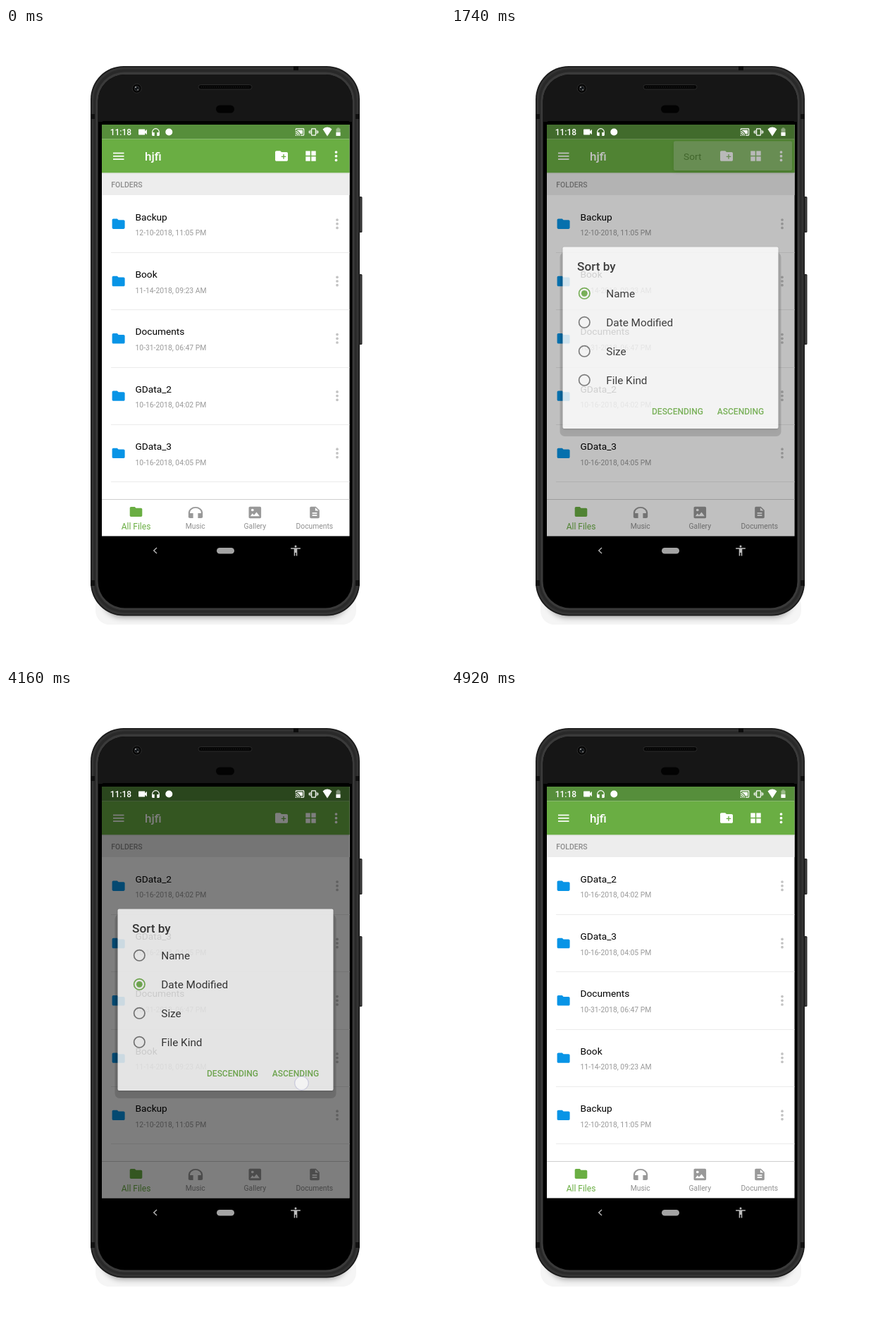
Write an HTML page with a canvas that moves like this. It is 623 px wide and 899 px high and loops after 5360 ms.

```html
<!DOCTYPE html>
<html lang="en">
<head>
<meta charset="utf-8">
<title>File list sorting</title>
<style>
html, body { margin: 0; width: 100%; height: 100%; overflow: hidden; background: #fff; }
canvas { display: block; width: 623px; height: 899px; }
</style>
</head>
<body>
<canvas id="stage" width="623" height="899"></canvas>
<script>
const W = 623, H = 899, LOOP = 5360;
const stage = document.getElementById('stage').getContext('2d');
const sheet = document.createElement('canvas');
sheet.width = W;
sheet.height = H;
const sheetCtx = sheet.getContext('2d');
let c = stage;

const GREEN = '#6aae43', GREY = '#999';
const ROW = 81.3;
const files = [
  ['Backup', '12-10-2018, 11:05 PM'],
  ['Book', '11-14-2018, 09:23 AM'],
  ['Documents', '10-31-2018, 06:47 PM'],
  ['GData_2', '10-16-2018, 04:02 PM'],
  ['GData_3', '10-16-2018, 04:05 PM']
];
const byDate = [3, 4, 2, 1, 0].map(i => files[i]);
const options = ['Name', 'Date Modified', 'Size', 'File Kind'];

// Icons on a 24 unit grid
const paths = {
  folder: 'M10 4H4c-1.1 0-2 .9-2 2v12c0 1.1.9 2 2 2h16c1.1 0 2-.9 2-2V8c0-1.1-.9-2-2-2h-8z',
  newFolder: 'M20 6h-8l-2-2H4c-1.1 0-2 .9-2 2v12c0 1.1.9 2 2 2h16c1.1 0 2-.9 2-2V8c0-1.1-.9-2-2-2zm-1 7.7h-2.9v2.9h-1.5v-2.9h-2.9v-1.5h2.9V9.300h1.5v2.9H19z',
  headset: 'M12 3a9 9 0 0 0-9 9v7c0 1.1.9 2 2 2h4v-8H5v-1a7 7 0 0 1 14 0v1h-4v8h4c1.1 0 2-.9 2-2v-7a9 9 0 0 0-9-9z',
  page: 'M14 2H6c-1.1 0-2 .9-2 2v16c0 1.1.9 2 2 2h12c1.1 0 2-.9 2-2V8zm2 16H8v-2h8zm0-4H8v-2h8zm-3-5V3.500L18.500 9z',
  image: 'M4 2h16c1.1 0 2 .9 2 2v16c0 1.1-.9 2-2 2H4c-1.1 0-2-.9-2-2V4c0-1.1.9-2 2-2zM4.500 18.500h15l-5-7-4 5-2.500-3zM8 5.500a2.200 2.200 0 1 0 0 4.400 2.200 2.200 0 1 0 0-4.400z',
  video: 'M17 10.500V7c0-.5-.5-1-1-1H4c-.5 0-1 .5-1 1v10c0 .5.5 1 1 1h12c.5 0 1-.5 1-1v-3.500l4 4v-11z',
  cast: 'M1 18v3h3a3 3 0 0 0-3-3zm0-4v2a5 5 0 0 1 5 5h2a7 7 0 0 0-7-7zM19 7H5v1.600A13 13 0 0 1 13.400 17H19zM1 10v2a9 9 0 0 1 9 9h2A11 11 0 0 0 1 10zM21 3H3a2 2 0 0 0-2 2v3h2V5h18v14h-7v2h7a2 2 0 0 0 2-2V5a2 2 0 0 0-2-2z',
  vibrate: 'M0 15h2V9H0zm3 2h2V7H3zM22 9v6h2V9zm-3 8h2V7h-2zM16.500 3h-9A1.500 1.500 0 0 0 6 4.500v15A1.500 1.500 0 0 0 7.500 21h9a1.500 1.500 0 0 0 1.500-1.500v-15A1.500 1.500 0 0 0 16.500 3zM16 19H8V5h8z',
  wifi: 'M0 7A18 18 0 0 1 24 7L12 22z',
  person: 'M12 2a2 2 0 1 1 0 4 2 2 0 1 1 0-4zM21 9h-6v13h-2v-6h-2v6H9V9H3V7h18z'
};
const icons = {};
for (const name in paths) icons[name] = new Path2D(paths[name]);

const clamp = v => Math.min(1, Math.max(0, v));
const ramp = (t, a, b) => clamp((t - a) / (b - a));
const easeOut = v => 1 - (1 - v) * (1 - v);

function rect(x, y, w, h, fill) {
  c.fillStyle = fill;
  c.fillRect(x, y, w, h);
}

function round(x, y, w, h, r, fill, stroke, line = 1) {
  c.beginPath();
  c.roundRect(x, y, w, h, r);
  if (fill) { c.fillStyle = fill; c.fill(); }
  if (stroke) { c.strokeStyle = stroke; c.lineWidth = line; c.stroke(); }
}

function disc(x, y, r, fill, stroke, line = 1) {
  c.beginPath();
  c.arc(x, y, r, 0, Math.PI * 2);
  if (fill) { c.fillStyle = fill; c.fill(); }
  if (stroke) { c.strokeStyle = stroke; c.lineWidth = line; c.stroke(); }
}

function text(str, x, y, size, fill, weight = 400, align = 'left') {
  c.font = `${weight} ${size}px Roboto, sans-serif`;
  c.textAlign = align;
  c.fillStyle = fill;
  c.fillText(str, x, y);
}

function icon(name, x, y, sx, fill, sy = sx) {
  c.save();
  c.translate(x, y);
  c.scale(sx, sy);
  c.translate(-12, -12);
  c.fillStyle = fill;
  c.fill(icons[name], 'evenodd');
  c.restore();
}

function dots(x, y, fill) {
  for (let i = -1; i < 2; i++) disc(x, y + i * 5.7, 1.85, fill);
}

// Draws a window as one flat group with a single opacity
function layer(alpha, draw) {
  if (alpha <= 0) return;
  sheetCtx.clearRect(0, 0, W, H);
  c = sheetCtx;
  draw();
  c = stage;
  c.globalAlpha = alpha;
  c.drawImage(sheet, 0, 0);
  c.globalAlpha = 1;
}

function clipped(x, y, w, h, draw) {
  c.save();
  c.beginPath();
  c.rect(x, y, w, h);
  c.clip();
  draw();
  c.restore();
}

function withShadow(color, blur, dy, draw) {
  c.save();
  c.shadowColor = color;
  c.shadowBlur = blur;
  c.shadowOffsetY = dy;
  draw();
  c.restore();
}

function phone() {
  rect(0, 0, W, H, '#fff');
  round(127, 800, 370, 46, 20, '#f5f5f5');
  withShadow('rgba(0,0,0,.4)', 10, 3, () => round(138, 780, 346, 52, 42, '#333'));

  for (const [y, h] of [[239, 51], [349, 100]]) {
    round(499, y, 6.5, h, 1.5, '#2b2b2b');
    rect(503, y + 2, 1, h - 4, '#4a4a4a');
  }
  round(120, 54, 382, 779.5, 47, '#191919');
  round(121.5, 55.5, 379, 776.5, 46, '#333');
  round(124.5, 58.5, 373, 770.5, 43, '#292929');
  round(127.5, 62.5, 367, 763, 41, '#3a3a3a');
  for (const x of [120, 496]) {
    rect(x, 122, 6, 7, '#111');
    rect(x, 783, 6, 8, '#111');
  }
  rect(408, 54, 7, 6, '#0c0c0c');
  round(130.5, 66, 361, 756.5, 38, '#000');
  clipped(130, 60, 362, 73, () => round(130.5, 66, 361, 756.5, 38, '#161616'));
  rect(137, 132, 350, 5, '#000');

  disc(185.7, 85.7, 6.5, '#050505', '#2b2b2b');
  disc(185.7, 85.7, 3.4, '#101418', '#333');
  disc(184, 84, 1, '#aaa');
  disc(187, 87.5, .9, '#888');
  round(273, 80.5, 76, 6.5, 3.2, '#060606', '#2a2a2a');
  c.setLineDash([1, 2]);
  c.strokeStyle = '#222';
  c.beginPath();
  c.moveTo(277, 83.7);
  c.lineTo(346, 83.7);
  c.stroke();
  c.setLineDash([]);
  round(298, 109.5, 26, 11, 5.5, '#030303');

  c.strokeStyle = '#bbb';
  c.lineWidth = 1.3;
  c.beginPath();
  c.moveTo(214, 737);
  c.lineTo(209.7, 741);
  c.lineTo(214, 745);
  c.stroke();
  round(299, 737, 25, 8.5, 4.25, '#a4a4a4');
  icon('person', 411, 741, .76, '#bdbdbd');
}

function app(list) {
  rect(136, 137, 351.5, 583.5, '#fff');
  rect(136, 205, 351.5, 32, '#ededed');
  rect(136, 137, 351.5, 20.5, '#568e3b');
  rect(136, 157.5, 351.5, 48, GREEN);
  rect(136, 205.5, 351.5, 1, '#dcdfda');

  for (let i = -1; i < 2; i++) rect(152, 180.9 + i * 4.3, 15.5, 1.7, '#fff');
  text('hjfi', 197, 188, 17.1, '#fff', 500);
  icon('newFolder', 391, 181.5, .9, '#fff');
  for (const x of [425.3, 433.3])
    for (const y of [174.4, 182.3]) rect(x, y, 6.4, 6.4, '#fff');
  dots(468.5, 181.7, '#fff');
  text('FOLDERS', 149.2, 226, 10.5, '#8c8c8c', 500);

  list.forEach(([name, date], i) => {
    const y = 277.7 + i * ROW;
    icon('folder', 159.6, y, .9, '#0894e6');
    text(name, 183.5, y - 5, 13.7, '#000');
    text(date, 183.5, y + 16.6, 10.35, GREY);
    dots(470, y, '#c3c3c3');
    rect(149, Math.round(y + 40.3), 338.5, 1, '#ebebeb');
  });

  rect(136, 668, 351.5, 1, '#cfcfcf');
  icon('folder', 184.5, 686, .88, GREEN);
  text('All Files', 184.5, 710.5, 12, GREEN, 400, 'center');
  icon('headset', 269, 687, 1.13, GREY, .88);
  icon('image', 353.3, 687, .88, GREY, .82);
  icon('page', 438, 687, .85, GREY, .82);
  ['Music', 'Gallery', 'Documents'].forEach((s, i) =>
    text(s, 268.8 + i * 84.5, 709.8, 10.3, '#8f8f8f', 400, 'center'));
}

function statusIcons() {
  text('11:18', 147.7, 152.3, 12, '#fff', 500);
  icon('video', 194, 147.5, .66, '#fff');
  icon('headset', 212.5, 147.5, .6, '#fff');
  disc(231.3, 147.5, 5, '#fff');
  icon('cast', 417, 147.5, .57, '#fff');
  icon('vibrate', 436.5, 147.5, .57, '#fff');
  icon('wifi', 456, 146.8, .54, '#fff', .66);
  round(468.5, 142.5, 6, 10.5, 1, 'rgba(255,255,255,.4)');
  rect(470, 141.5, 3, 1, 'rgba(255,255,255,.4)');
  rect(468.5, 148, 6, 5, '#fff');
}

function popup(open, press) {
  const w = 168 * (.4 + .6 * open), h = 41.5 * (.4 + .6 * open);
  const x = 484 - w;
  withShadow('rgba(0,0,0,.35)', 6, 2, () => round(x, 160.5, w, h, 2, '#fff'));
  clipped(x, 160.5, w, h, () => {
    if (press > 0) disc(403, 175, 95 * press, 'rgba(0,0,0,.12)');
    text('Sort', 330, 186.7, 13.7, '#212121');
  });
}

function radio(x, y, on) {
  disc(x, y, 7.7, null, on > .4 ? GREEN : '#6e6e6e', 1.7);
  if (on > 0) disc(x, y, 4.4 * on, GREEN);
}

function dialog(t) {
  const swap = ramp(t, 3360, 3520);
  withShadow('rgba(0,0,0,.12)', 4, 0, () =>
    round(154.5, 318, 314, 261, 7, 'rgba(0,0,0,.17)'));
  withShadow('rgba(0,0,0,.2)', 3, 1, () =>
    round(158.5, 310.5, 306, 257.5, 2, '#fff'));

  const grow = easeOut(ramp(t, 3270, 3500));
  const fade = 1 - ramp(t, 3460, 3670);
  if (grow > 0 && fade > 0)
    clipped(158.5, 397, 306, 41, () =>
      disc(265, 424.5, 10 + 195 * grow, `rgba(0,0,0,${.12 * fade})`));

  text('Sort by', 179, 344, 17.2, '#212121', 500);
  options.forEach((s, i) => {
    const y = 376.3 + i * 41;
    radio(189.3, y, i === 0 ? 1 - swap : i === 1 ? swap : 0);
    text(s, 220.3, y + 5.8, 15.3, '#212121');
  });
  text('DESCENDING', 285, 548.3, 12, GREEN, 500);
  text('ASCENDING', 377.8, 548.3, 12, GREEN, 500);
}

function touch(t, x, y, from, to) {
  if (t < from || t >= to) return;
  c.globalAlpha = 1 - .6 * ramp(t, to - 90, to);
  disc(x, y, 9.8, 'rgba(255,255,255,.55)', 'rgba(150,150,195,.4)', 1.2);
  c.globalAlpha = 1;
}

function draw(t) {
  phone();
  app(t < 4140 ? files : byDate);

  const ring = ramp(t, 450, 540), ringFade = 1 - ramp(t, 560, 700);
  if (ring > 0 && ringFade > 0)
    clipped(136, 157.5, 351.5, 48, () =>
      disc(468.5, 181.5, 8 + 12 * ring, `rgba(255,255,255,${.25 * ringFade})`));

  const popupAlpha = t < 1300 ? ramp(t, 500, 600) : 1 - ramp(t, 1664, 1770);
  layer(popupAlpha, () =>
    popup(easeOut(ramp(t, 500, 720)), easeOut(ramp(t, 1400, 1600))));

  const dim = t < 3000
    ? .6 * ramp(t, 1682, 1825)
    : .6 * (1 - ramp(t, 4138, 4284)) + .012 * ramp(t, 4240, 4284) * (1 - ramp(t, 4284, 4320));
  if (dim > 0) rect(136, 137, 351.5, 583.5, `rgba(0,0,0,${dim})`);
  statusIcons();

  const shown = t < 3000 ? ramp(t, 1660, 1760) : 1 - ramp(t, 4138, 4248);
  layer(shown, () => dialog(t));

  touch(t, 468, 182, 340, 600);
  touch(t, 403, 175, 1300, 1740);
  touch(t, 265, 424.5, 3200, 3440);
  touch(t, 419.5, 557.5, 3980, 4270);
}

function frame() {
  draw(performance.now() % LOOP);
  requestAnimationFrame(frame);
}
frame();
</script>
</body>
</html>
```
